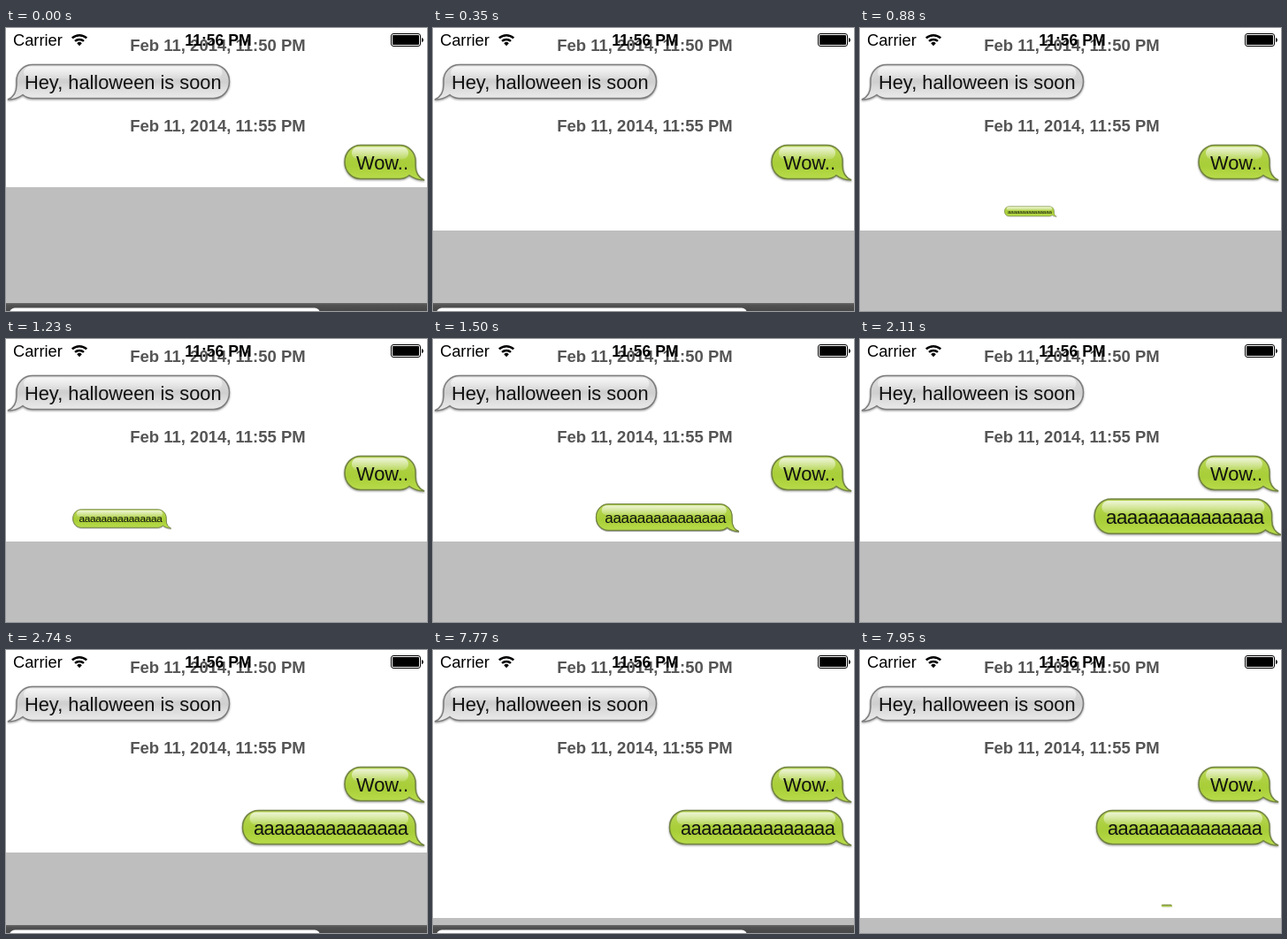
Write an HTML page that moves like this. It is 476 px wide and 320 px high and loops after 8000 ms.

```html
<!DOCTYPE html>
<html lang="en">
<head>
<meta charset="utf-8">
<title>Chat</title>
<style>
html, body { margin: 0; width: 100%; height: 100%; overflow: hidden; background: #fff; }
svg { display: block; width: 476px; height: 320px; }
text { font-family: "Liberation Sans", Arial, sans-serif; }
.msg { font-size: 21.8px; fill: #111; }
.run { letter-spacing: -.5px; }
.date { font-size: 18.5px; font-weight: bold; fill: #555; text-anchor: middle; }
.clock { font-size: 17.6px; font-weight: bold; text-anchor: middle; }
.carrier { font-size: 18.3px; }
.body { stroke-width: 1.5; filter: drop-shadow(0 1.5px 1px rgba(0, 0, 0, .4)); }
.green { fill: url(#green); stroke: #71833f; }
.grey { fill: url(#grey); stroke: #7c7c7c; }
</style>
</head>
<body>
<svg viewBox="0 0 476 320">
  <defs>
    <linearGradient id="green" x2="0" y2="1">
      <stop offset="0" stop-color="#bcd95c"/>
      <stop offset=".45" stop-color="#aacf3c"/>
      <stop offset=".6" stop-color="#a8ce38"/>
      <stop offset="1" stop-color="#bade4c"/>
    </linearGradient>
    <linearGradient id="grey" x2="0" y2="1">
      <stop offset="0" stop-color="#dedede"/>
      <stop offset=".5" stop-color="#cfcfcf"/>
      <stop offset=".65" stop-color="#dadada"/>
      <stop offset="1" stop-color="#ececec"/>
    </linearGradient>
    <linearGradient id="gloss" x2="0" y2="1">
      <stop offset="0" stop-color="#fff" stop-opacity=".75"/>
      <stop offset="1" stop-color="#fff" stop-opacity=".15"/>
    </linearGradient>
    <linearGradient id="steel" x2="0" y2="1">
      <stop offset="0" stop-color="#686868"/>
      <stop offset=".3" stop-color="#505050"/>
      <stop offset="1" stop-color="#484848"/>
    </linearGradient>
  </defs>

  <rect width="476" height="320" fill="#fff"/>
  <text class="date" x="239.5" y="26">Feb 11, 2014, 11:50 PM</text>
  <text class="date" x="239.5" y="117">Feb 11, 2014, 11:55 PM</text>

  <text class="carrier" x="8" y="20">Carrier</text>
  <g fill="none" stroke="#000" stroke-width="2.5">
    <path d="M74.8 11.4a12 12 0 0 1 16.4 0M78 14.9a7.4 7.4 0 0 1 10 0"/>
    <path d="M83 20.2l-2.8-3a4 4 0 0 1 5.6 0z" fill="#000" stroke="none"/>
  </g>
  <text class="clock" x="240" y="20">11:56 PM</text>
  <rect x="435.5" y="6.5" width="33" height="14" rx="2.5" fill="none" stroke="#000"/>
  <rect x="437" y="8" width="30" height="11" rx="1"/>
  <path d="M470 11q2 .5 2 2.5t-2 2.5z"/>

  <g id="chat"></g>
  <rect id="backdrop" width="476" fill="#bebebe"/>
  <g id="first"></g>
  <g id="second"></g>
  <g id="bar">
    <rect y="311" width="476" height="9" fill="url(#steel)"/>
    <rect x="4" y="316.5" width="351" height="20" rx="6" fill="#fff"/>
  </g>
</svg>
<script>
const $ = id => document.getElementById(id);
const LOOP = 8000, STEP = 88, ROW = 74;
const CX = 370, CY = 200.5; // resting centre of the flying bubble

// Speech bubble: (x, y) is the top corner of the body on the tail side
function bubble(x, y, w, kind) {
  const flip = kind === 'grey' ? -1 : 1;
  const d = `M${18 - w} 0H-18C-8 0 0 8 0 18V23C0 31 4 37 10 39.5C3 39.5-3 37-7 34
    C-10 36.5-14 38-18 38H${18 - w}C${8 - w} 38 ${-w} 30 ${-w} 19S${8 - w} 0 ${18 - w} 0Z`;
  return `<g transform="translate(${x} ${y}) scale(${flip} 1)">
    <path class="body ${kind}" d="${d}"/>
    <rect x="${8 - w}" y="2" width="${w - 16}" height="14" rx="7" fill="url(#gloss)"/></g>`;
}
const label = (x, y, s, extra = '') => `<text class="msg ${extra}" x="${x}" y="${y}">${s}</text>`;

$('chat').innerHTML =
  bubble(12, 41.5, 240.5, 'grey') + label(21, 68.5, 'Hey, halloween is soon') +
  bubble(463, 132.5, 80, 'green') + label(396, 159.5, 'Wow..');
$('first').innerHTML = $('second').innerHTML =
  bubble(463, 181.5, 195.5, 'green') + label(280, 208.5, 'a'.repeat(15), 'run');

// Flight path: step, centre x, centre y, scale
const path = [
  [1, 372, 217, 0], [2, 347, 215, .06], [7, 158.5, 205.5, .345], [9, 124, 203.5, .48],
  [10, 131, 203, .54], [14, 265, 201.5, .786], [18, 367.5, 200.5, .995],
  [19, CX, CY, 1.03], [22, CX, CY, 1]
];

// Smooth curve through the path points
function pose(k) {
  const last = path.length - 1;
  if (k >= path[last][0]) return path[last].slice(1);
  let i = 0;
  while (k >= path[i + 1][0]) i++;
  const a = path[i], b = path[i + 1], h = b[0] - a[0], u = (k - a[0]) / h;
  const slope = (j, c) => {
    const p = path[Math.max(j - 1, 0)], q = path[Math.min(j + 1, last)];
    return (q[c] - p[c]) / (q[0] - p[0]);
  };
  return [1, 2, 3].map(c =>
    a[c] * (1 + 2 * u) * (1 - u) ** 2 + b[c] * u * u * (3 - 2 * u) +
    h * u * (1 - u) * (slope(i, c) * (1 - u) - slope(i + 1, c) * u));
}

function fly(el, t, dy) {
  const k = Math.floor((t - 266) / STEP);
  const shown = k > 1;
  el.style.display = shown ? '' : 'none';
  if (!shown) return;
  const [x, y, s] = pose(k);
  el.setAttribute('transform', `translate(${x} ${y + dy}) scale(${s}) translate(${-CX} ${-CY})`);
}

function draw(t) {
  const top = t < 270 ? 180 : t < 7770 ? 229 : 229 + ROW;
  $('backdrop').setAttribute('y', top);
  $('backdrop').setAttribute('height', 320 - top);
  $('bar').style.display = t < 360 || (t >= 2740 && t < 7860) ? '' : 'none';
  fly($('first'), t, 0);
  fly($('second'), t - 7500, ROW);
}

const start = performance.now();
function tick() {
  draw((performance.now() - start) % LOOP);
  requestAnimationFrame(tick);
}
tick();
</script>
</body>
</html>
```
